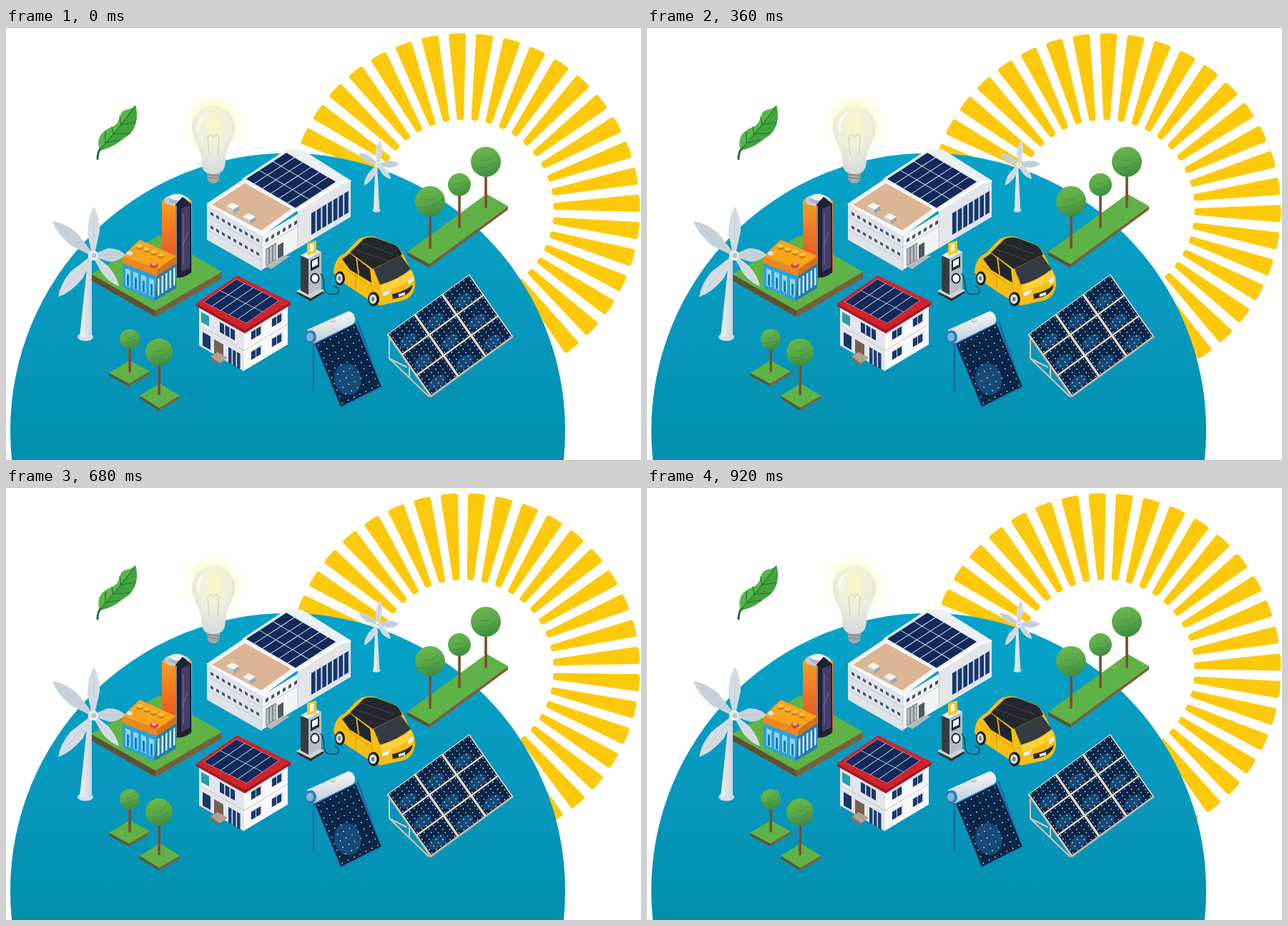
Animation of 888x604 px, one loop 0.96 s. Source, as an HTML page:

```html
<!DOCTYPE html>
<html lang="en">
<head>
<meta charset="utf-8">
<title>Renewable energy</title>
<style>
  html, body { margin: 0; width: 100%; height: 100%; overflow: hidden; background: #fff; }
  svg { display: block; }
</style>
</head>
<body>
<svg id="stage" width="888" height="604" viewBox="0 0 888 604"></svg>
<script>
const stage = document.getElementById('stage');
const repeat = (n, draw) => Array.from({ length: n }, (_, i) => draw(i)).join('');

const poly = (fill, points) => `<polygon fill="${fill}" points="${points}"/>`;
const shape = (fill, d) => `<path fill="${fill}" d="${d}"/>`;
const line = (color, width, d) =>
  `<path fill="none" stroke="${color}" stroke-width="${width}" stroke-linecap="round" stroke-linejoin="round" d="${d}"/>`;
const oval = (fill, x, y, rx, ry = rx) => `<ellipse fill="${fill}" cx="${x}" cy="${y}" rx="${rx}" ry="${ry}"/>`;

// Upright parallelogram: a piece of an isometric wall.
const slab = (fill, x, y, w, h, slope) => shape(fill, `M${x},${y}l${w},${w * slope}v${h}l${-w},${-w * slope}z`);
const slabs = (n, step, fill, x, y, w, h, slope) =>
  repeat(n, i => slab(fill, x + i * step, y + i * step * slope, w, h, slope));

// Solar panel spanned by the vectors u and v, drawn on a 100 x 100 plane.
function panel([x, y], u, v, cols, rows, { frame = '#c9d5e3', gap = 1.6, dots } = {}) {
  const w = 100 / cols, h = 100 / rows;
  const cells = repeat(cols * rows, i => {
    const cx = i % cols * w + gap / 2, cy = Math.floor(i / cols) * h + gap / 2;
    const glint = dots ? oval('#164a78', cx + w * .36, cy + h * .66, w * .29, h * .23) : '';
    return `<rect x="${cx}" y="${cy}" width="${w - gap}" height="${h - gap}" fill="${dots ? '#0b2648' : '#13295a'}"/>${glint}`;
  });
  let sparkle = '';
  if (dots) {
    const [nx, ny] = dots;
    const d = repeat(nx * ny, i => `M${(i % nx + .5) * 100 / nx},${(Math.floor(i / nx) + .5) * 100 / ny}h0`);
    sparkle = `<path d="${d}" stroke="#dfeaf2" stroke-width="1.7" stroke-linecap="round" vector-effect="non-scaling-stroke"/>`;
  }
  const matrix = [...u, ...v].map(n => n / 100);
  return `<g transform="matrix(${matrix} ${x} ${y})"><rect width="100" height="100" fill="${frame}"/>${cells}${sparkle}</g>`;
}

const tree = (x, y, r, ground) =>
  line('#76492d', 3.6, `M${x},${y}V${ground}`) + line('#8f6240', 1, `M${x - 1},${y + r}V${ground}`) +
  oval('url(#crown)', x, y, r) +
  line('#3f8f3f', .8, `M${x - r * .8},${y + r * .45}Q${x + r * .3},${y + r * .5} ${x + r * .9},${y - r * .2}M${x - r * .3},${y - r * .1}q${r * .4},${r * .2} ${r * .8},${-r * .3}`);

const lawn = (left, bottom, right, top, depth) => {
  const drop = ([x, y]) => [x, y + depth];
  return poly('#5f5130', [left, bottom, drop(bottom), drop(left)]) +
    poly('#7a6039', [bottom, right, drop(right), drop(bottom)]) +
    poly('#5fb346', [left, bottom, right, top]);
};

function turbine(x, y, foot, scale, blades) {
  const tower = poly('url(#tower)', [[x - 7 * scale, y], [x - 2 * scale, y], [foot[0] + 9 * scale, foot[1]], [foot[0] - 8 * scale, foot[1]]]);
  const sails = blades.map(([dx, dy, w], i) => {
    const len = Math.hypot(dx, dy), angle = Math.atan2(dx, -dy) * 180 / Math.PI;
    const d = `M-1.5,0L${-w / 2},${-len * .45}Q${-w / 2},${-len * .8} 0,${-len}Q${w / 2},${-len * .8} ${w / 2},${-len * .5}L1.5,0z`;
    return `<g transform="translate(${x} ${y}) rotate(${angle})">${shape(i % 2 ? '#c6d1da' : '#d3dce3', d)}${line('#b5c1cb', .6, `M0,-4V${-len * .8}`)}</g>`;
  }).join('');
  return oval('#d5dde3', foot[0], foot[1], 11 * scale, 5.5 * scale) + tower + sails +
    oval('#eef2f5', x, y, 7 * scale) + oval('#b8c4ce', x + scale, y, 3.5 * scale);
}

const gradient = (id, stops, attrs = 'x2="0" y2="1"', kind = 'linear') =>
  `<${kind}Gradient id="${id}" ${attrs}>${stops.map(([at, color, alpha = 1]) =>
    `<stop offset="${at}" stop-color="${color}" stop-opacity="${alpha}"/>`).join('')}</${kind}Gradient>`;

const defs = `<defs>${[
  gradient('sea', [[0, '#05a3c8'], [.55, '#0898bf'], [1, '#008fac']], 'gradientUnits="userSpaceOnUse" x1="0" y1="175" x2="0" y2="604"'),
  gradient('crown', [[0, '#69b84d'], [.55, '#58a647'], [1, '#3e8a3e']], 'x1=".3" x2=".6" y2="1"'),
  gradient('tower', [[0, '#f0f3f5'], [1, '#c8d3dc']], ''),
  gradient('cell', [[0, '#f7a126'], [.4, '#f47c20'], [1, '#d9432c']]),
  gradient('tank', [[0, '#ffffff'], [1, '#b9c7d2']], 'x1=".4" x2=".6" y2="1"'),
  gradient('glow', [[.45, '#fff7a8', .8], [1, '#fffde8', 0]], '', 'radial'),
  gradient('glass', [[0, '#fbf6c4'], [.5, '#eeeede'], [1, '#d6d8da']], 'cx=".5" cy=".25" r=".75"', 'radial'),
].join('')}</defs>`;

const sun = `<g id="sun" fill="#fdc90b" stroke="#fdc90b" stroke-width="6" stroke-linejoin="round">${
  repeat(40, i => `<path d="M-1.8,-128.5H1.8L9,-243.3Q0,-244 -9,-243.3z" transform="rotate(${i * 9})"/>`)}</g>`;

const leaves =
  shape('#56b848', 'M131,171C125,150 137,143 149,138C162,132 156,119 166,115C173,113 178,112 181,108C185,123 183,140 171,150C159,158 151,167 131,171z') +
  shape('#43a33f', 'M131,171Q150,150 181,108C185,123 183,140 171,150C159,158 151,167 131,171z') +
  line('#236f32', 1.2, 'M131,170Q152,148 180,110M139,161v-16M150,149l-2,-11M161,136l-2,-12M140,160l19,-3M151,148l22,-1M162,135l19,-3') +
  line('#236f32', 3, 'M128,183Q128,174 132,169') +
  shape('#58b947', 'M713,509C721,519 734,517 739,531Q742,540 740,549C726,548 715,542 713,531Q715,520 713,509z') +
  line('#23783a', 1, 'M713,510Q727,527 740,549M721,520l-6,7M729,531l-11,5M734,539l-8,6M721,520l11,1M728,529l12,2') +
  line('#23783a', 1.8, 'M739,547Q742,552 741,559');

const bulb =
  oval('url(#glow)', 290, 136, 48) +
  shape('#a5a7a8', 'M280,199H300L298,213L293,217H287L282,213z') +
  line('#77797b', 1.2, 'M281,205l18,2M281,209l17,2') +
  shape('url(#glass)', 'M260,139A30,30 0 0 1 320,139C320,156 309,164 307,182C307,198 303,204 290,204C277,204 273,198 273,182C271,164 260,156 260,139z') +
  line('#c9c9bc', 1, 'M284,178L282,152L287,148L290,153L294,148L298,152L296,178') +
  shape('#f8f8f3', 'M266,141Q267,124 281,117Q270,130 271,146z');

const batteries =
  lawn([119, 344], [209, 395], [302, 341], [214, 290], 9) +
  shape('url(#cell)', 'M218,242Q239,226 260,242V341Q239,354 218,341z') +
  oval('#c3ccd3', 239, 241, 18, 8) + oval('#eef1f3', 239, 237, 11, 5) + shape('#a9b4bd', 'M228,237v5q11,8 22,0v-5q-11,8 -22,0z') +
  shape('#202234', 'M237,247L247,236L259,246V342Q249,350 237,349z') +
  shape('#443e69', 'M245,252L257,248V335L245,341z') +
  line('#77709a', 1, 'M248,260v70M254,286l-7,19') + line('#a6a8ab', 1.5, 'M238,249v99') +
  shape('#2ba1d8', 'M163,327L211,345L207,382L163,362z') +
  slabs(4, 11, '#8fd6f0', 167, 336, 7, 24, .4) + slabs(4, 11, '#147bb5', 169, 344, 3, 16, .4) +
  poly('#257db1', '211,346 238,326 238,364 207,382') +
  slabs(5, 5.5, '#d5edf5', 212, 351, 2.5, 24, -.66) +
  poly('#f9a51b', '163,319 187,296 238,319 212,337') +
  poly('#ed8722', '163,319 212,337 211,347 163,329') + poly('#d96f1b', '212,337 238,319 238,329 211,347') +
  repeat(4, i => oval('#c9780c', 187 + i * 10, 307 + i * 4, 4.5, 3) + oval('#ffc64c', 187 + i * 10, 305 + i * 4, 4, 2.4)) +
  oval('#dbe0e2', 173, 315, 4, 3) + oval('#dd4736', 207, 332, 6, 4) + oval('#f1b3a7', 207, 330, 3, 2);

const warehouse =
  slab('#dfe3e8', 281, 246, 77, 50, .57) + slab('#f2f4f6', 358, 290, 124, 48, -.6) +
  poly('#e2e5e9', '408,256 466,216 482,214 482,264 408,308') +
  poly('#f8f8f8', '280,246 334,210 409,254 358,291') + poly('#dcb595', '288,247 334,217 399,253 357,283') +
  poly('#edf0f3', '330,211 392,170 414,170 482,213 470,218 408,256') +
  panel([335, 211], [57, -37], [70, 41], 3, 6) +
  line('#ffffff', 3, 'M408,255L468,216L481,214') + line('#b9c0c8', .8, 'M358,291v47M281,263l77,44L408,277M281,282l77,44M408,257v50') +
  slabs(9, 8, '#45536a', 286, 257, 4, 4, .57) + slabs(9, 8, '#45536a', 286, 276, 4, 4, .57) +
  slabs(6, 8, '#45536a', 363, 295, 4, 5, -.6) + slab('#cdd7e2', 426, 259, 54, 31, -.6) +
  slabs(7, 7.7, '#17376c', 427, 259, 5.6, 30, -.6) +
  slab('#7d8791', 363, 309, 15, 24, -.6) + slabs(3, 5, '#b7bfc7', 364, 310, 3, 21, -.6) +
  slab('#4f5962', 380, 304, 8, 19, -.6) + poly('#b3b9bd', '363,333 388,318 397,319 371,337') +
  [[310, 249], [333, 264]].map(([x, y]) =>
    poly('#f5f5f3', [[x - 2, y], [x + 6, y - 5], [x + 16, y], [x + 8, y + 5]]) +
    slab('#c5c7c8', x - 2, y, 10, 6, .5) + slab('#a2a7aa', x + 8, y + 5, 8, 6, -.62)).join('');

const house =
  slab('#e2e5ea', 270, 388, 63, 56, .57) + slab('#f7f8fa', 333, 424, 61, 55, -.6) +
  line('#bfc5cc', 1, 'M270,415l63,36l61,-37') +
  slab('#2a9dab', 273, 397, 11, 17, .57) + slab('#f1f1f0', 271, 410, 14, 5, .57) +
  slabs(3, 7.5, '#17376c', 299, 411, 6, 14, .57) + slab('#17376c', 275, 425, 11, 19, .57) +
  slab('#75604f', 291, 435, 13, 22, .57) + slabs(3, 6, '#203f73', 311, 446, 4.5, 22, .57) +
  poly('#b5a08e', '286,459 296,453 310,461 299,469') + poly('#856f61', '286,459 299,469 299,473 286,463') +
  [[343, 425], [372, 407], [343, 453], [372, 435]].map(([x, y]) =>
    slab('#d0d6dd', x - 1, y - 1, 16, 13, -.6) + slabs(2, 7, '#17376c', x, y, 6, 11, -.6)).join('') +
  poly('#a9171e', '266,385 334,422 398,383 398,387 334,427 266,389') +
  poly('#d6202a', '266,385 323,346 398,383 334,422') +
  panel([276, 383], [46, -32], [60, 30], 2, 5);

const charger =
  poly('#2b2f34', '406,371 425,360 445,370 426,382') + poly('#d0d3d5', '406,368 425,357 445,367 426,378') +
  poly('#383c42', '412,318 423,323 423,373 412,367') + poly('#b9bec3', '423,323 441,313 441,364 423,373') +
  poly('#e7e9ea', '412,318 430,308 441,313 423,323') +
  slab('#f7c81e', 421, 301, 13, 17, -.3) + slab('#ffffff', 425, 303, 5, 10, -.3) +
  slab('#1d2734', 426, 325, 12, 15, -.5) + slab('#eff4f5', 428, 326, 8, 9, -.5) +
  oval('#25282c', 432, 350, 6.5, 7.5) + oval('#ffffff', 432, 350, 4.5, 5.5) +
  line('#174355', 1.5, 'M440,344C449,350 439,370 453,372C470,374 467,362 459,361');

const wheel = (x, y, rx, ry) =>
  oval('#1d2024', x, y, rx, ry) + oval('#d9dde0', x - .8, y, rx * .66, ry * .68) + oval('#727980', x - .8, y, rx * .27, ry * .3);

const car =
  shape('#f7bd13', 'M458,342Q459,321 474,315L490,298Q499,289 516,292L544,303Q554,309 564,335Q573,344 572,360Q569,377 555,381L523,388L506,379L474,358z') +
  shape('#24272b', 'M481,314L500,295Q508,291 519,294L543,303Q550,306 554,317L513,337z') +
  shape('#343b43', 'M514,337L552,318L566,337Q548,352 523,359z') +
  shape('#20262d', 'M470,323L481,315L509,337L511,356L481,338z') + line('#f7bd13', 1.8, 'M490,321l3,23') +
  line('#45494e', 1, 'M496,300l45,16M487,309l48,17') +
  shape('#ffd23c', 'M524,360Q550,352 566,339Q571,347 566,351Q548,364 524,369z') +
  line('#cf930a', 1, 'M467,331L507,360M489,344v22M510,358l3,10') +
  shape('#e8f1f4', 'M526,370l13,-4l-5,7l-7,2zM562,353l8,-6l-1,7l-6,5z') +
  shape('#252a2d', 'M540,372Q556,369 569,359Q567,371 553,376L541,379z') + slab('#eef1f1', 549, 372, 9, 4, -.3) +
  wheel(467, 350, 7, 10) + wheel(514, 379, 8, 10);

const heater =
  line('#1e68a7', 2.5, 'M430,440V508M436,445L469,528L523,502M492,411L523,500') +
  panel([431, 441], [58, -29], [37, 90], 1, 1, { frame: '#286da5', gap: 3, dots: [7, 10] }) +
  line('url(#tank)', 0, 'M0,0') +
  shape('url(#tank)', 'M421,422L479,396Q486,397 488,405Q489,411 485,414L430,441z') +
  oval('#2b7fb9', 426, 432, 8, 9.5) + oval('#7fb6d8', 425, 432, 5, 6) +
  oval('#dce3e7', 457, 409, 4, 3) + line('#8b9aa5', .8, 'M453,409q4,4 8,0');

const solarField =
  line('#d8c6b2', 2, 'M536,432V462L591,515M536,462L560,474M564,471V488') +
  panel([533, 428], [115, -84], [61, 87], 3, 3, { frame: '#e5d8c8', gap: 2.4, dots: [18, 18] }) +
  line('#c9b59e', 1.4, 'M533,429L594,516L709,432');

stage.innerHTML = defs + sun + leaves +
  oval('url(#sea)', 394, 563, 388) + bulb + warehouse +
  turbine(520, 191, [518, 255], .5, [[3, -34, 9], [-27, -16, 9], [-19, 29, 9], [30, -1, 10], [18, 20, 8]]) +
  lawn([561, 313], [592, 330], [702, 249], [672, 232], 5) +
  tree(671, 187, 21, 250) + tree(634, 219, 16, 278) + tree(593, 242, 21, 307) +
  batteries +
  turbine(122, 318, [111, 432], 1, [[1, -68, 17], [-57, -48, 19], [-49, 58, 19], [45, -1, 19], [36, 43, 13]]) +
  charger + car + house + heater + solarField +
  lawn([144, 482], [172, 497], [201, 480], [173, 465], 4) + tree(173, 435, 14, 480) +
  lawn([187, 514], [214, 531], [243, 514], [215, 497], 4) + tree(214, 453, 19, 512);

const sunGroup = document.getElementById('sun');
const LOOP = 960, STEP = 40;

// Each loop turns the sun by one ray spacing (9 degrees) in 24 steps.
function tick(now) {
  const step = Math.floor(now % LOOP / STEP);
  sunGroup.setAttribute('transform', `translate(640 254) rotate(${step * 9 * STEP / LOOP - 2.1})`);
  requestAnimationFrame(tick);
}
tick(performance.now());
</script>
</body>
</html>
```
